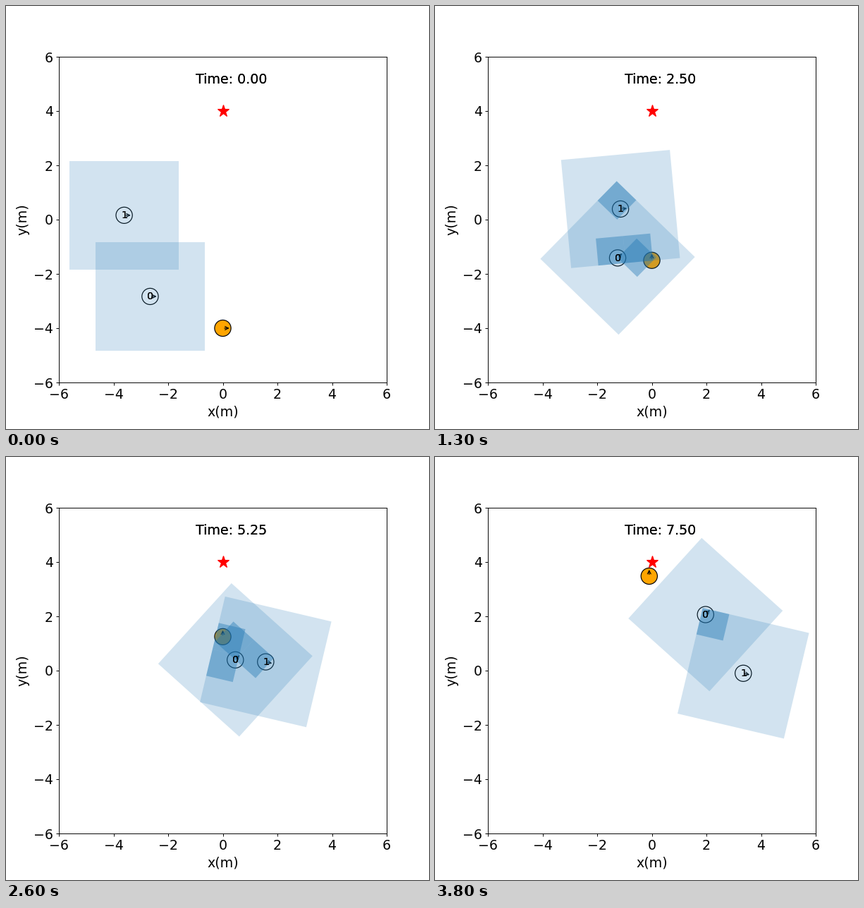
A matplotlib script for the animation above (3.9 s loop, 600 by 600 pixels).

```python
import math

import matplotlib.pyplot as plt
from matplotlib.animation import FuncAnimation
from matplotlib.patches import ArrowStyle, Circle, FancyArrowPatch, Polygon

S = 6 / 7  # all point sizes are designed for a 7 inch figure
DT = 0.25
LAST_STEP = 30
TURN_STEP = 17  # walkers head straight for their goals from here on
RADIUS = 0.3
TICKS = 39

plt.rcParams.update({
    "font.family": "DejaVu Sans",
    "axes.linewidth": 0.8 * S,
    "axes.labelsize": 16 * S,
    "axes.labelpad": 4 * S,
    "patch.linewidth": 1.0 * S,
})
for axis in ("xtick", "ytick"):
    plt.rcParams.update({
        f"{axis}.labelsize": 16 * S,
        f"{axis}.major.size": 3.5 * S,
        f"{axis}.major.width": 0.8 * S,
        f"{axis}.major.pad": 3.5 * S,
    })


def advance(x, y, heading, speed):
    return (x + speed * DT * math.cos(heading),
            y + speed * DT * math.sin(heading), heading)


def walker_path(start, early, cruise):
    """Avoid the other walker first, then approach the mirrored start point."""
    goal = (-start[0], -start[1])
    path = [(*start, 0.0)]
    for step in range(LAST_STEP):
        x, y, _ = path[-1]
        if step < TURN_STEP:
            degrees, speed = early[step] if step < len(early) else cruise
            heading = math.radians(degrees)
        else:
            dx, dy = goal[0] - x, goal[1] - y
            heading, speed = math.atan2(dy, dx), min(1, math.hypot(dx, dy))
        path.append(advance(x, y, heading, speed))
    return path


def robot_path():
    path = [(0.0, -4.0, 0.0)]
    for step in range(1, LAST_STEP + 1):
        heading = math.radians(112.5 if step == 28 else 90)
        path.append(advance(*path[-1][:2], heading, 1))
    return path


robot = robot_path()
walkers = [
    walker_path((-2.66, -2.83), [(44.6, v) for v in (0.62, 0.71, 0.77, 0.81, 0.84)],
                (45.7, 0.85)),
    walker_path((-3.61, 0.16), [(6, 0.9)], (5.3, 1)),
]

fig = plt.figure(figsize=(6, 6), dpi=100, facecolor="white")
ax = fig.add_axes([0.125, 0.11, 0.775, 0.77])
ax.set(xlim=(-6, 6), ylim=(-6, 6), xlabel="x(m)", ylabel="y(m)",
       xticks=range(-6, 7, 2), yticks=range(-6, 7, 2))
ax.plot([0], [4], "*", color="red", markersize=15 * S, markeredgewidth=S)

artists = []


def label(x, y, text, size):
    # Stacked twice for a slightly heavier antialiased edge.
    for _ in range(2):
        artists.append(ax.text(x, y, text, color="black", fontsize=size * S))


def patch(item):
    artists.append(ax.add_patch(item))


def arrow(x, y, heading):
    tip = (x + RADIUS * math.cos(heading), y + RADIUS * math.sin(heading))
    patch(FancyArrowPatch((x, y), tip, color="black", shrinkA=2 * S, shrinkB=2 * S,
                          mutation_scale=1,
                          arrowstyle=ArrowStyle("->", head_length=4 * S, head_width=2 * S)))


def local_square(pose, left, bottom, size, alpha):
    x, y, heading = pose
    c, s = math.cos(heading), math.sin(heading)
    corners = [(left, bottom), (left + size, bottom),
               (left + size, bottom + size), (left, bottom + size)]
    points = [(x + u * c - v * s, y + u * s + v * c) for u, v in corners]
    patch(Polygon(points, closed=True, facecolor="tab:blue", edgecolor="none",
                  linewidth=0, alpha=alpha))


def occupied_cells(pose, others):
    x, y, heading = pose
    c, s = math.cos(heading), math.sin(heading)
    cells = set()
    for ox, oy, _ in others:
        dx, dy = ox - x, oy - y
        u, v = math.floor(dx * c + dy * s), math.floor(dy * c - dx * s)
        if -2 <= u < 2 and -2 <= v < 2:
            cells.add((u, v))
    return sorted(cells)


def draw(tick):
    while artists:
        artists.pop().remove()
    step = tick - (tick + 3) // 5  # every fifth tick holds the pose
    robot_pose = robot[step]
    poses = [path[step] for path in walkers]

    patch(Circle(robot_pose[:2], RADIUS, facecolor="orange", edgecolor="black"))
    for i, (x, y, _) in enumerate(poses):
        patch(Circle((x, y), RADIUS, fill=False, edgecolor="black"))
        label(x - 0.11, y - 0.11, str(i), 12)
    for pose in [robot_pose, *poses]:
        arrow(*pose)
    for i, pose in enumerate(poses):
        local_square(pose, -2, -2, 4, 0.2)
        for u, v in occupied_cells(pose, [robot_pose, poses[1 - i]]):
            local_square(pose, u, v, 1, 0.4)
    label(-1, 5, f"Time: {step * DT:.2f}", 16)


animation = FuncAnimation(fig, draw, frames=TICKS, init_func=lambda: draw(0),
                          interval=100, repeat=True, repeat_delay=0)
plt.show()
```
